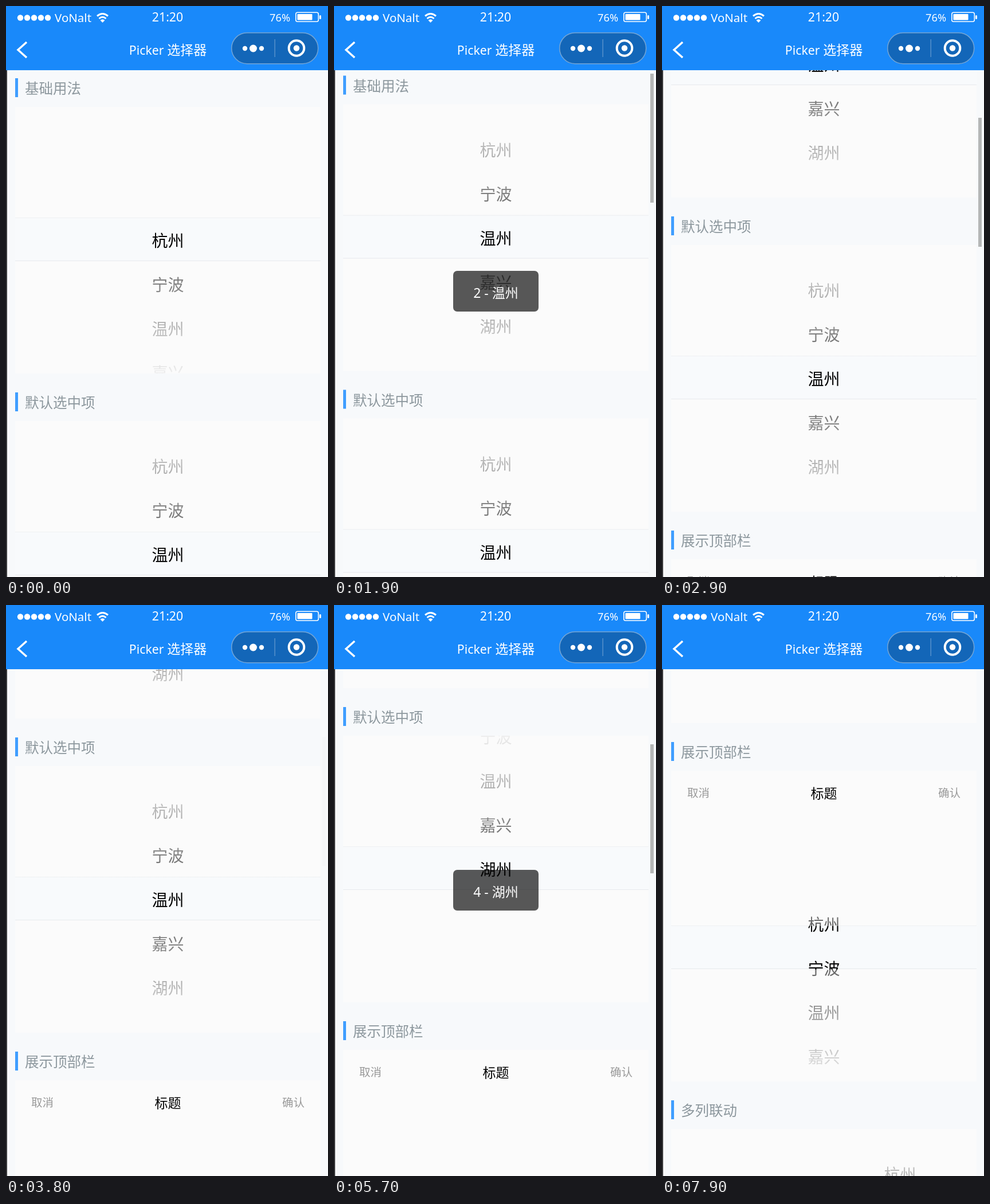
Animation, 562 px wide and 996 px high, one loop 8000 ms. Source, as an HTML page:

```html
<!DOCTYPE html>
<html lang="zh-CN">
<head>
<meta charset="utf-8">
<title>Picker</title>
<style>
html, body { margin: 0; width: 100%; height: 100%; overflow: hidden; }
body { background: #f7f9fb; font-family: "Noto Sans", "Noto Sans CJK SC", "Noto Sans CJK", sans-serif; }
#stage { position: relative; width: 562px; height: 996px; overflow: hidden; background: #f7f9fb; }
#stage div, #stage span, svg { position: absolute; white-space: nowrap; }
#edge { left: 0; top: 112px; width: 1.5px; height: 884px; background: #3a3a3c; }
#page { left: 0; top: 0; width: 562px; }

.section { left: 16px; width: 533px; }
.mark { width: 5px; height: 33px; background: #409eff; }
.heading { left: 17px; line-height: 36px; font-size: 24.5px; color: #8c979d; }
.bar { top: 50px; width: 533px; height: 78px; line-height: 78px; background: #fbfbfb; text-align: center; }
.bar span { font-size: 19.5px; color: #999; }
.bar .title { left: 0; width: 533px; font-size: 23px; color: #000; }
.picker { width: 533px; height: 465px; overflow: hidden; background: #fbfbfb; }
.band { top: 193px; width: 533px; height: 74px; border: solid #e7eaed; border-width: 1.5px 0; background: #f8fafc; }
.reel { width: 100%; top: 195px; }
.reel span { left: 0; width: 533px; height: 77px; line-height: 77px; text-align: center; font-size: 28px; font-weight: 300; color: #000; }
.mask { width: 533px; height: 194px; background: linear-gradient(rgba(251,251,251,.95), rgba(251,251,251,.4)); }
.mask.low { top: 270px; height: 195px; transform: scaleY(-1); }

#header { left: 0; top: 0; width: 562px; height: 112px; background: #1989fa; color: #fff; }
#header span { line-height: 30px; }
#thumb { left: 552px; width: 6px; height: 225px; background: #b4b6b6; }
#toast { left: 208px; top: 462px; width: 149px; height: 71px; border-radius: 7px; background: rgba(0,0,0,.65);
  color: #fff; font-size: 23px; line-height: 76px; text-align: center; }
</style>
</head>
<body>
<div id="stage">
  <div id="page"></div>
  <div id="edge"></div>
  <div id="thumb"></div>
  <div id="header">
    <svg width="562" height="112" fill="#fff">
      <g id="signal"></g>
      <g fill="none" stroke="#fff" stroke-width="3">
        <path d="M159 17.500Q168.500 9.500 178 17.500M162.500 22Q168.500 16.500 174.500 22"/>
        <path d="M36 63L21 76.500L36 90" stroke-width="3.500"/>
        <rect x="505.800" y="11.300" width="39.500" height="16" rx="3" stroke-width="1.600"/>
      </g>
      <path d="M164.500 25Q168.500 21.500 172.500 25L168.500 29Z"/>
      <rect x="508.500" y="14" width="26" height="10.500" rx="1"/>
      <rect x="547" y="16" width="3" height="7" rx="1.500"/>
      <rect x="393.700" y="46.700" width="151" height="54" rx="27" fill="#1366b8" stroke="#74a5d5" stroke-width="1.500"/>
      <circle cx="417" cy="74" r="4.200"/><circle cx="431.500" cy="74" r="6.500"/><circle cx="446" cy="74" r="4.200"/>
      <rect x="468.500" y="58" width="1.400" height="31" fill="#5c94cc"/>
      <circle cx="507" cy="73.500" r="13.300" fill="none" stroke="#fff" stroke-width="4"/>
      <circle cx="507" cy="73.500" r="5.200"/>
    </svg>
    <span style="left:85px;top:5px;font-size:20.500px">VoNalt</span>
    <span style="left:0;width:564px;top:4px;font-size:21.300px;text-align:center">21:20</span>
    <span style="left:460px;top:5px;font-size:18.300px">76%</span>
    <span style="left:0;width:565px;top:61px;font-size:21.300px;text-align:center">Picker <b style="font-size:23px;font-weight:400">选择器</b></span>
  </div>
  <div id="toast"></div>
</div>
<script>
const $ = id => document.getElementById(id);
const cities = ['杭州', '宁波', '温州', '嘉兴', '湖州'];
const ROW = 77;

function addSection(top, heading, hasBar, x = 0, selected = 0, items = cities) {
  const rows = items.map((name, i) => `<span style="top:${i * ROW}px">${name}</span>`).join('');
  const bar = hasBar ? `<div class="bar"><span style="left:28px">取消</span>
    <span class="title">标题</span><span style="right:28px">确认</span></div>` : '';
  $('page').insertAdjacentHTML('beforeend', `<div class="section" style="top:${top}px">
    <div class="mark"></div><div class="heading">${heading}</div>${bar}
    <div class="picker" style="top:${hasBar ? 127 : 50}px"><div class="band"></div>
      <div class="reel" style="left:${x}px">${rows}</div>
      <div class="mask"></div><div class="mask low"></div></div></div>`);
  const reel = $('page').lastElementChild.querySelector('.reel');
  const turn = index => { reel.style.transform = `translateY(${-index * ROW}px)`; };
  turn(selected);
  return turn;
}

const turns = [
  addSection(126, '基础用法'),
  addSection(674, '默认选中项'),
  addSection(1222, '展示顶部栏', true)
];
addSection(1847, '多列联动', false, 133, 2, ['杭州']);

$('signal').innerHTML = [0, 1, 2, 3, 4].map(i => `<circle cx="${25 + i * 12}" cy="20.500" r="5.200"/>`).join('');

const easeIn = p => k => k ** p;
const easeOut = p => k => 1 - (1 - k) ** p;
const smooth = k => k * k * (3 - 2 * k);

// Keys are [time, value, easing towards this key].
function track(keys, t) {
  const i = keys.findIndex(key => key[0] > t);
  if (i < 0) return keys[keys.length - 1][1];
  if (i === 0) return keys[0][1];
  const [t0, v0] = keys[i - 1], [t1, v1, ease = k => k] = keys[i];
  return v0 + (v1 - v0) * ease((t - t0) / (t1 - t0));
}

const scroll = [[1800, 0], [1900, 4.5], [2900, 307, easeIn(1.4)], [3300, 443, easeOut(1.4)],
  [5600, 443], [5700, 496], [6600, 879, easeOut(1.15)], [7000, 983, easeOut(1.35)]];
const reels = [
  [[400, 0], [1100, 2, smooth]],
  [[4000, 2], [4400, 3.7, smooth], [4600, 3.7], [4900, 4, easeOut(1.5)]],
  [[7800, 0], [7900, .55]]
];
const thumbAlpha = [[1800, 0], [1900, 1], [3500, 1], [3800, .04], [3900, 0],
  [5600, 0], [5700, 1], [7200, 1], [7600, 0]];
const toasts = [[1200, 2700, '2 - 温州'], [4900, 6400, '4 - 湖州']];

function draw(now) {
  const t = Math.floor(now % 8000 / 100) * 100; // the screen refreshes ten times a second
  const y = track(scroll, t);
  $('page').style.transform = `translateY(${-y}px)`;
  $('thumb').style.top = 117 + y * .2545 + 'px';
  $('thumb').style.opacity = track(thumbAlpha, t);
  turns.forEach((turn, i) => turn(track(reels[i], t)));
  const toast = toasts.find(([from, to]) => t >= from && t < to);
  $('toast').style.display = toast ? 'block' : 'none';
  $('toast').textContent = toast ? toast[2] : '';
}

const start = performance.now();
(function loop() {
  draw(performance.now() - start);
  requestAnimationFrame(loop);
})();
</script>
</body>
</html>
```
